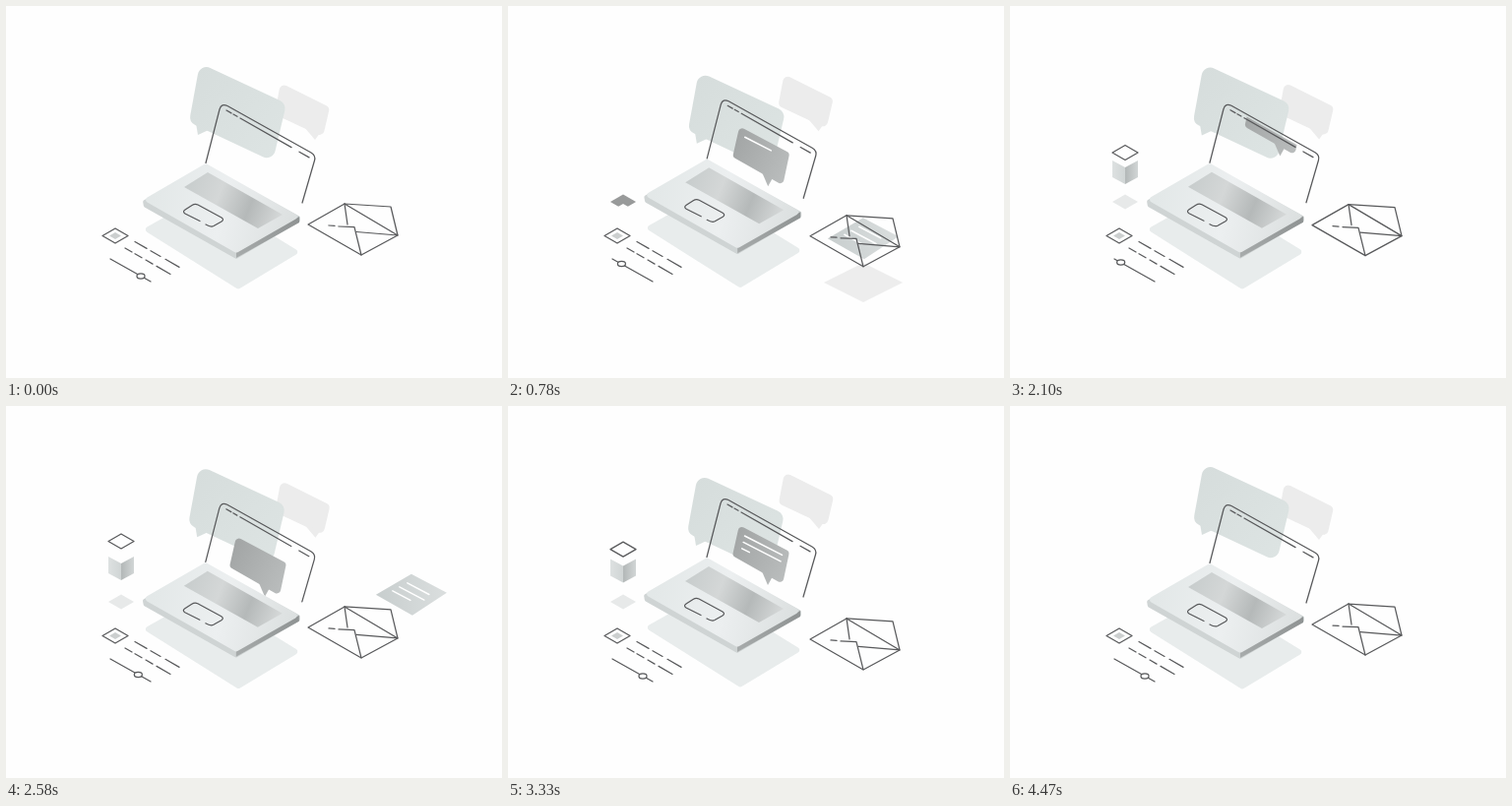
An HTML page with a canvas for the animation above (4.5 s loop, 504x378 px).

```html
<!DOCTYPE html>
<html lang="en">
<head>
<meta charset="utf-8">
<title>Isometric mail</title>
<style>
html, body { margin: 0; width: 100%; height: 100%; overflow: hidden; background: #fefefe; }
canvas { display: block; width: 504px; height: 378px; }
</style>
</head>
<body>
<canvas id="stage" width="504" height="378"></canvas>
<script>
const ctx = document.getElementById('stage').getContext('2d');
const LOOP = 4500, HALF = 2250, STEP = 30;
const INK = '#58595b';

const clamp = v => Math.min(1, Math.max(0, v));
const ramp = (t, from, to) => clamp((t - from) / (to - from));
const smooth = u => (1 - Math.cos(Math.PI * u)) / 2;
const mix = (a, b, u) => a + (b - a) * u;

function at(x, y, draw) {
  ctx.save();
  ctx.translate(x, y);
  draw();
  ctx.restore();
}

function trace(points, closed) {
  ctx.beginPath();
  points.forEach(([x, y], i) => i ? ctx.lineTo(x, y) : ctx.moveTo(x, y));
  if (closed) ctx.closePath();
}

function fill(points, color) {
  trace(points, true);
  ctx.fillStyle = color;
  ctx.fill();
}

function stroke(points, closed = false, color = INK, width = 1.25) {
  trace(points, closed);
  ctx.strokeStyle = color;
  ctx.lineWidth = width;
  ctx.stroke();
}

// Fill with corners softened by the given radius.
function fillRound(points, radius, color) {
  const n = points.length, [ax, ay] = points[0], [bx, by] = points[n - 1];
  ctx.beginPath();
  ctx.moveTo((ax + bx) / 2, (ay + by) / 2);
  points.forEach(([x, y], i) => {
    const [nx, ny] = points[(i + 1) % n];
    ctx.arcTo(x, y, nx, ny, radius);
  });
  ctx.closePath();
  ctx.fillStyle = color;
  ctx.fill();
}

const diamond = (x, y, w, h) => [[x - w, y], [x, y - h], [x + w, y], [x, y + h]];

function gradient(x0, y0, x1, y1, ...colors) {
  const g = ctx.createLinearGradient(x0, y0, x1, y1);
  colors.forEach((c, i) => g.addColorStop(i / (colors.length - 1), c));
  return g;
}

function backBubbles(bob) {
  at(2 * bob, -11 * bob, () => {
    fillRound([[279, 78], [329, 103], [322, 133], [273, 110]], 5, '#ececec');
    fill([[303, 123], [314, 136], [319, 129]], '#ececec');
  });
  at(-4 * bob, 11 * bob, () => {
    const tint = gradient(190, 70, 280, 150, '#d6dddc', '#dde4e3');
    fillRound([[197, 58], [285, 99], [271, 158], [186, 118]], 9, tint);
    fill([[193, 119], [195, 131], [208, 125]], tint);
  });
}

function message(t) {
  const shift = 75 * Math.pow(1 - ramp(t, 0, 600), 3) - 75 * Math.pow(ramp(t, 1750, 2200), 3);
  ctx.save();
  trace([[203, 159], [218, 100], [314, 154], [301, 216]], true);
  ctx.clip();
  at(-0.267 * shift, shift, () => {
    const tint = gradient(230, 140, 286, 170, '#a2a5a5', '#b9bcbc');
    fillRound([[236, 127], [287, 154], [280, 187], [229, 158]], 4, tint);
    fill([[259, 174], [265, 188], [270, 179]], tint);
    ctx.globalAlpha = 1 - ramp(t, 1600, 1780);
    for (let i = 0; i < 4; i++) {
      const grow = ramp(t, 640 + 200 * i, 840 + 200 * i);
      if (!grow) continue;
      const x = 241.5 - 1.4 * i, y = 138 + 6.4 * i, len = (i === 3 ? 25 : 38) * grow;
      stroke([[x, y], [x + len, y + len * 0.51]], false, '#fff', 1.5);
    }
  });
  ctx.restore();
}

function laptop(t, bob) {
  at(0, -2 * bob, () => fillRound([[139, 227], [203, 191], [299, 250], [236, 288]], 3, '#e8ecec'));
  at(-bob, -6 * bob, () => {
    message(t);

    fillRound([[139, 198], [203, 162], [299, 214], [299, 219], [234, 257], [140, 204]], 2, '#cfd4d4');
    fill([[234, 250], [298, 214], [298, 220], [234, 256]], gradient(234, 253, 298, 217, '#a7abab', '#8f9393'));
    fillRound([[139, 197], [203, 160], [299, 214], [234, 251]], 3,
      gradient(150, 190, 290, 225, '#e3e8e8', '#eceff0', '#dce0e0'));
    fill([[205, 169], [281, 212], [256, 226], [181, 184]],
      gradient(185, 180, 278, 218, '#c8cdcd', '#d4d7d7', '#b5b9b9', '#d6d9d9'));

    ctx.beginPath();
    ctx.moveTo(197, 218.5);
    ctx.lineTo(182, 211);
    ctx.quadraticCurveTo(179, 209, 182, 207);
    ctx.lineTo(189, 202.5);
    ctx.quadraticCurveTo(192, 200.5, 195, 202);
    ctx.lineTo(219, 215);
    ctx.quadraticCurveTo(222, 217, 219, 219);
    ctx.lineTo(211, 223.5);
    ctx.quadraticCurveTo(208, 225, 203, 222);
    ctx.strokeStyle = INK;
    ctx.lineWidth = 1.25;
    ctx.stroke();

    ctx.beginPath();
    ctx.moveTo(203, 159.5);
    ctx.lineTo(217, 105);
    ctx.quadraticCurveTo(219, 98.5, 225, 101.5);
    ctx.lineTo(310, 149);
    ctx.quadraticCurveTo(315, 152, 313.5, 157);
    ctx.lineTo(301, 200);
    ctx.stroke();
    [[224, 229], [231, 235], [238, 290], [298, 308]].forEach(([a, b]) =>
      stroke([[a, 106 + (a - 224) * 0.57], [b, 106 + (b - 224) * 0.57]]));
  });
}

function envelope(t, bob) {
  const seen = ramp(t, 500, 760) * (1 - ramp(t, 820, 1050));
  ctx.globalAlpha = seen;
  fill(diamond(361, 281, 40, 20), '#ededed');

  const fly = smooth(ramp(t, 150, 830));
  ctx.globalAlpha = ramp(t, 60, 240) * (1 - ramp(t, 790, 1000));
  at(mix(422, 360, fly), mix(183, 237, fly), () => {
    fill([[-36, 0], [0, -21], [36, -2], [1, 21]], gradient(-30, 0, 30, 0, '#c9cfcf', '#d9dddd'));
    [[-19, -4, 18], [-12, -8, 25], [-4, -12, 22]].forEach(([x, y, len]) =>
      stroke([[x, y], [x + len, y + len * 0.53]], false, '#fff', 1.5));
  });
  ctx.globalAlpha = 1;

  at(0, 15 * bob, () => {
    stroke([[307, 222], [344, 201], [391, 204], [398, 233], [361, 253]], true);
    stroke([[344, 201], [398, 233], [356, 229.5]]);
    stroke([[344, 201], [347, 222]]);
    stroke([[328, 223], [334, 223.4]]);
    stroke([[338, 224], [354, 224.7], [361, 253]]);
  });
}

function controls(t) {
  stroke(diamond(111, 233.5, 13, 7.5), true);
  fill(diamond(111, 233.5, 6, 3.6), '#cccfcf');
  const dashes = (x, y, spans) => spans.forEach(([a, b]) =>
    stroke([[x + a, y + a * 0.575], [x + b, y + b * 0.575]]));
  dashes(131, 239.5, [[0, 12], [16, 26], [31, 45]]);
  dashes(121, 246, [[0, 7], [10, 17], [21, 28], [32, 46]]);

  const slide = smooth(ramp(t, 200, 1050)) - smooth(ramp(t, 1900, 2750));
  const x = 137 - 28 * slide, y = 274.5 - 16.2 * slide;
  stroke([[106, 257], [147, 280]]);
  ctx.beginPath();
  ctx.ellipse(x, y, 4, 2.6, 0, 0, 7);
  ctx.fillStyle = '#fefefe';
  ctx.fill();
  ctx.stroke();
}

function cube(t) {
  const open = smooth(ramp(t, 560, 760)) * (1 - smooth(ramp(t, 4050, 4300)));
  if (!open) return;
  const rise = smooth(ramp(t, 760, 1250)) * (1 - smooth(ramp(t, 3650, 4100)));
  const shade = Math.round(mix(152, 231, rise));
  fill(diamond(117, 199, 13 * open, 7.5 * open), `rgb(${shade},${shade + 2},${shade + 2})`);
  fill(diamond(117, 205, 7 * (1 - rise) * open, 4 * (1 - rise) * open), '#fefefe');
  if (!rise) return;

  const age = t - 1410;
  const spring = -10.5 * Math.exp(-Math.max(age, 0) / 1700) * Math.cos(2 * Math.PI * Math.max(age, 0) / 1230);
  ctx.globalAlpha = clamp(rise * 3);
  at(117, mix(199, 161 + Math.max(-1, spring * 0.45), rise), () => {
    const h = 17 * rise;
    fill([[-13, -7], [0, 0], [0, h], [-13, h - 7]], gradient(-13, 0, 0, 0, '#dde1e1', '#d0d5d5'));
    fill([[13, -7], [0, 0], [0, h], [13, h - 7]], gradient(0, 0, 13, 0, '#b2b7b7', '#d2d6d6'));
  });
  stroke(diamond(117, mix(199, 142.5 + spring, rise), 13, 7.5), true);
  ctx.globalAlpha = 1;
}

function render(now) {
  const t = Math.floor((now % LOOP) / STEP) * STEP;
  const half = t % HALF;
  const bob = smooth(2 * half / HALF);
  ctx.globalAlpha = 1;
  ctx.fillStyle = '#fefefe';
  ctx.fillRect(0, 0, 504, 378);
  ctx.lineCap = ctx.lineJoin = 'round';
  backBubbles(bob);
  laptop(half, bob);
  envelope(half, bob);
  controls(t);
  cube(t);
}

let start;
function tick(now) {
  start ??= now;
  render(now - start);
  requestAnimationFrame(tick);
}
render(0);
requestAnimationFrame(tick);
</script>
</body>
</html>
```
